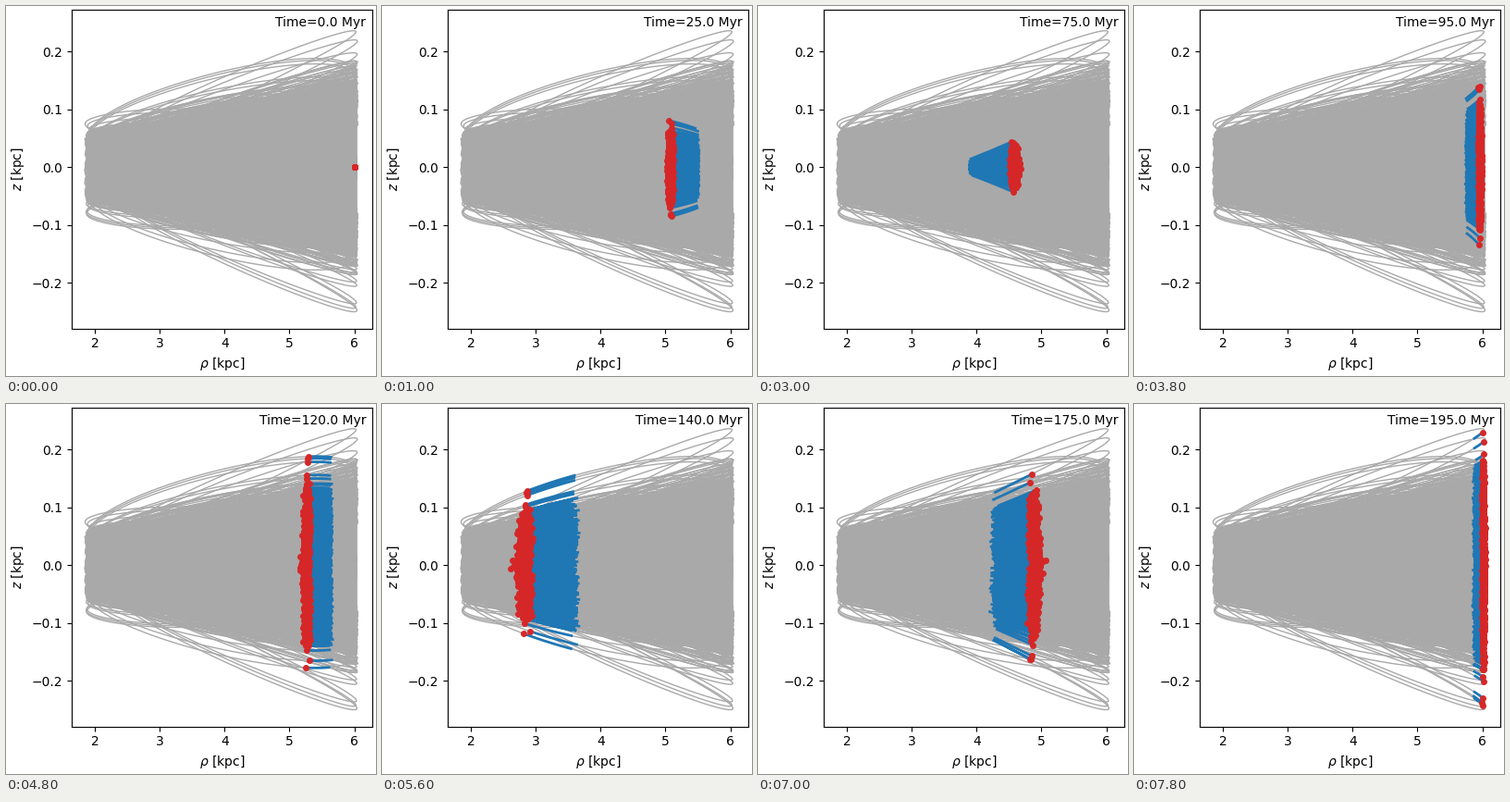
These frames come from a looping animation (400 px wide and 400 px high, 8 s). A matplotlib script:

```python
import numpy as np
import matplotlib.pyplot as plt
from matplotlib.animation import FuncAnimation

PERI, APO = 1.88, 6.037      # radial turning points, kpc
PERIOD, T_APO = 97.2, 3.85   # radial period and first apocentre, Myr
TURN = np.radians(218)       # vertical phase gained per radial period
SLOPE = 1.87                 # vertical frequency ~ rho ** -SLOPE
STEP, TRAIL, FRAMES = 5.0, 5.0, 40

rng = np.random.default_rng(4)


def base_orbit():
    """Radius and vertical phase against time in a logarithmic potential."""
    n = 4000
    psi = (np.arange(n) + 0.5) * np.pi / n
    mid, amp = (APO + PERI) / 2, (APO - PERI) / 2
    r = mid + amp * np.cos(psi)
    ang2 = 2 * np.log(APO / PERI) / (PERI ** -2 - APO ** -2)
    v = np.sqrt(2 * np.log(APO / r) - ang2 * (r ** -2 - APO ** -2))
    clock = np.cumsum(amp * np.sin(psi) / v)
    clock *= PERIOD / 2 / clock[-1]

    t = np.arange(0, 270, 0.05)
    lag = (t - T_APO) % PERIOD
    radius = np.interp(np.minimum(lag, PERIOD - lag), clock, r)
    rate = radius ** -SLOPE
    cycle = rate[t < PERIOD].sum()
    phase = np.concatenate([[0], np.cumsum(rate)[:-1]]) * TURN / cycle
    return t, radius, phase


GRID, RADIUS, PHASE = base_orbit()

# Vertical amplitudes at 6 kpc, with a few strongly heated stars
amp = rng.normal(0, 0.077, 1000)
amp = np.where(np.abs(amp) > 0.19, amp * 0.5, amp)
amp[:8] = [0.241, 0.225, 0.204, -0.256, -0.249, -0.241, -0.210, -0.203]
amp[8:10] = [0.012, -0.02]
count = len(amp)
bulge = np.exp(-(amp / 0.05) ** 2)
delay = rng.normal(0, 0.17, count).clip(-0.45, 0.45)
speed = rng.normal(0, 0.0018, count) + 0.002 * bulge
speed[8:10] = [0.011, 0.008]
depth = rng.normal(0, 0.013, count).clip(-0.03, 0.035)
reach = rng.normal(0, 0.008, count).clip(-0.012, 0.022)
wobble = rng.normal(1, 0.004, count) - 0.01 * (amp / 0.25) ** 2


def orbit(t, pick=slice(None)):
    """Positions of the picked stars (rows) at the times t (columns)."""
    t = np.atleast_1d(t)[None, :]
    a, d, s, p, q, w = (x[pick][:, None] for x in
                        (amp, delay, speed, depth, reach, wobble))
    grow = np.minimum(t / 20, 1)
    tau = np.maximum((t + d * grow) * (1 + s), 0)
    base = np.interp(tau, GRID, RADIUS)
    rho = base + p * (APO - base) / (APO - PERI) + q * grow
    z = a * (rho / 6) ** (SLOPE / 2) * np.sin(w * np.interp(tau, GRID, PHASE))
    return rho, z


def chain(t, pick=slice(None)):
    """All paths joined into one broken line."""
    return [np.pad(c, ((0, 0), (0, 1)), constant_values=np.nan).ravel()
            for c in orbit(t, pick)]


fig, ax = plt.subplots(figsize=(4, 4), dpi=100)
ax.set_xlim(1.643, 6.275)
ax.set_ylim(-0.279, 0.272)
ax.set_xlabel(r"$\rho$ [kpc]")
ax.set_ylabel(r"$z$ [kpc]")
fig.tight_layout(pad=0.3)

# Orbits: solid core plus the individual lines that shape its rim
core = np.linspace(1.89, 6.03, 60)
edge = 0.15 * (core / 6) ** (SLOPE / 2)
ax.fill_between(core, -edge, edge, color="darkgrey", zorder=1)
past = np.arange(0, 250, 1.0)
for i in np.flatnonzero(np.abs(amp) > 0.11):
    rho, z = orbit(past, slice(i, i + 1))
    ax.plot(rho[0], z[0], color="darkgrey", lw=1, zorder=1.5)

trail, = ax.plot([], [], color="tab:blue", lw=2, zorder=3)
stars, = ax.plot([], [], "o", color="tab:red", ms=4, zorder=4)
label = ax.text(0.98, 0.98, "", transform=ax.transAxes,
                ha="right", va="top", zorder=5)


def draw(frame):
    t = frame * STEP
    trail.set_data(*chain(np.linspace(max(t - TRAIL, 0), t, 6)))
    rho, z = orbit(t)
    stars.set_data(rho[:, 0], z[:, 0])
    label.set_text(f"Time={t:.1f} Myr")
    return trail, stars, label


anim = FuncAnimation(fig, draw, frames=FRAMES, interval=200,
                     init_func=lambda: draw(0), repeat=True, repeat_delay=0)
plt.show()
```
